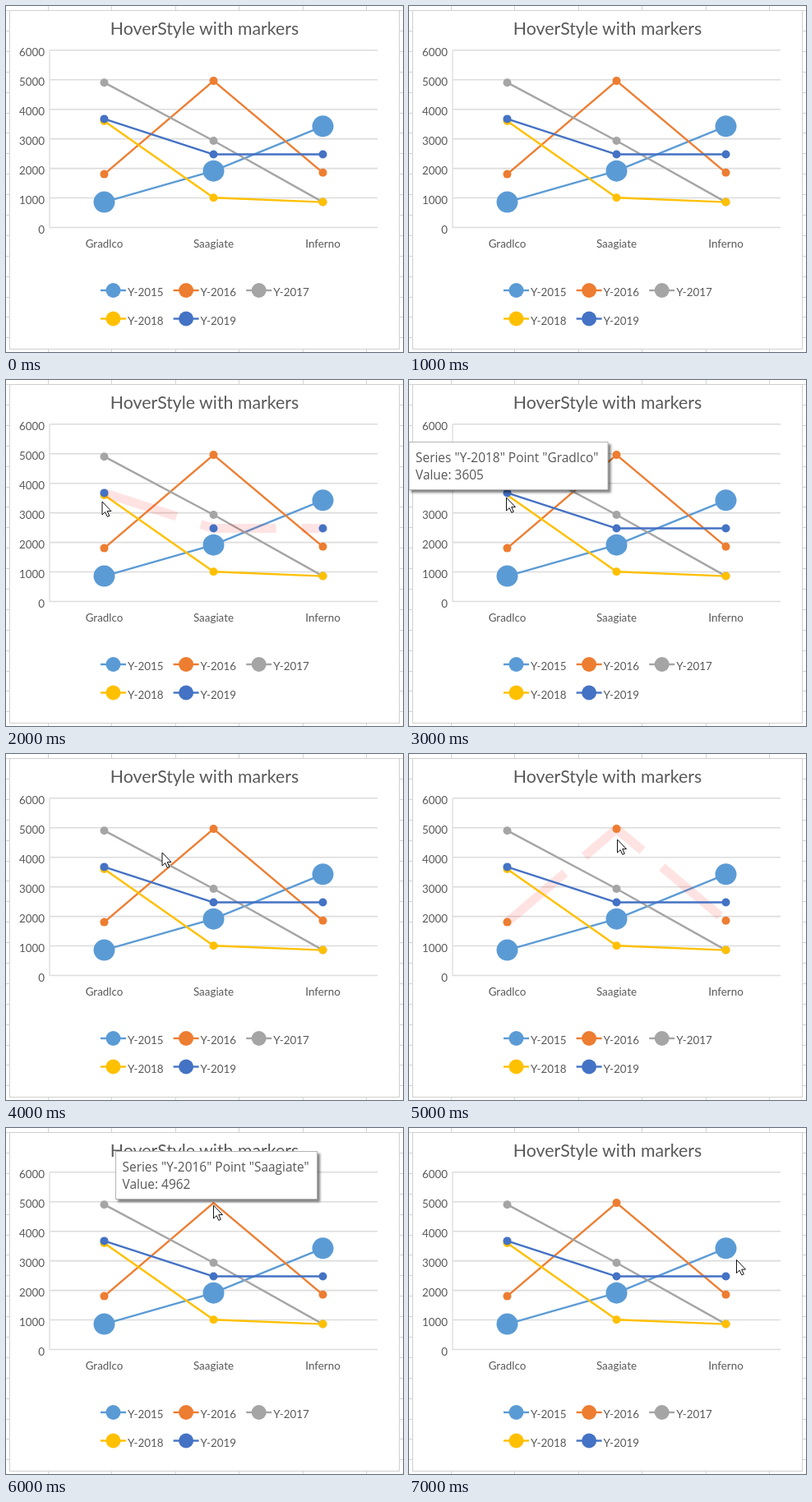
Write an HTML page that moves like this. It is 483 px wide and 421 px high and loops after 8000 ms.

```html
<!DOCTYPE html>
<html lang="en">
<head>
<meta charset="utf-8">
<style>
  html, body { margin: 0; width: 100%; height: 100%; overflow: hidden; background: #fff; }
  svg { display: block; }
  text { font: 13.4px Lato, sans-serif; fill: #595959; }
  .title { font-size: 21.3px; }
  .tip text { font: 15.45px "Open Sans", sans-serif; fill: #575757; }
  .middle { text-anchor: middle; }
  .end { text-anchor: end; }
  .hover { stroke: rgba(255, 0, 0, .11); stroke-width: 11; stroke-dasharray: 92.5 31; }
</style>
</head>
<body>
<svg id="stage" width="483" height="421" viewBox="0 0 483 421"></svg>
<script>
const stage = document.getElementById('stage');
const STEP_MS = 1000;
const columns = [119.5, 252.5, 385.5];
const categories = ['Gradlco', 'Saagiate', 'Inferno'];
const series = [
  { name: 'Y-2015', color: '#5b9bd5', radius: 13, values: [860, 1915, 3425] },
  { name: 'Y-2016', color: '#ed7d31', radius: 5, values: [1805, 4962, 1855] },
  { name: 'Y-2017', color: '#a5a5a5', radius: 5, values: [4905, 2935, 860] },
  { name: 'Y-2018', color: '#ffc000', radius: 5, values: [3605, 1010, 860] },
  { name: 'Y-2019', color: '#4472c4', radius: 5, values: [3675, 2475, 2475] },
];

// One entry per step: pointer position, hovered series, tooltip
const steps = [
  {},
  {},
  { cursor: [117, 148], hover: 4 },
  { cursor: [118.5, 143], tip: { x: 0, y: 75.5, width: 242, series: 3, point: 0 } },
  { cursor: [190, 120] },
  { cursor: [253.5, 104], hover: 1 },
  { cursor: [252.5, 94], tip: { x: 133.5, y: 28.5, width: 245, series: 1, point: 1 } },
  { cursor: [398.5, 160.5] },
];

const valueY = value => 269.5 - value * 0.03595;
const text = (x, y, content, cls = '') => `<text x="${x}" y="${y}" class="${cls}">${content}</text>`;
const line = (x1, y1, x2, y2, color, width = 1) =>
  `<path d="M${x1} ${y1}L${x2} ${y2}" stroke="${color}" stroke-width="${width}"/>`;
const dot = (x, y, r, color) => `<circle cx="${x}" cy="${y}" r="${r}" fill="${color}"/>`;

function sheet() {
  let out = '';
  for (let x = 51; x < 483; x += 77.4) out += line(Math.round(x) + .5, 0, Math.round(x) + .5, 421, '#d4d4d4');
  for (let y = 5; y < 421; y += 24.9) out += line(0, Math.round(y) + .5, 483, Math.round(y) + .5, '#d4d4d4');
  return out + '<rect x="4.5" y="5.5" width="474" height="412" fill="#fff" stroke="#d0d0d0"/>';
}

function axes() {
  let out = text(241.5, 35, 'HoverStyle with markers', 'title middle');
  for (let value = 0; value <= 6000; value += 1000) {
    const y = valueY(value);
    out += line(53, y, 452, y, '#dcdcdc', 1.6) + text(47, y + 7, value, 'end');
  }
  out += line(53, 54, 53, 270, '#dcdcdc', 1.3);
  categories.forEach((name, i) => out += text(columns[i], 294, name, 'middle'));
  return out;
}

function legend() {
  return series.map(({ name, color }, i) => {
    const x = 115 + i % 3 * 88.6, y = i < 3 ? 346 : 380.5;
    return line(x, y, x + 31, y, color, 2.4) + dot(x + 15.5, y, 9, color) + text(x + 33, y + 7, name);
  }).join('');
}

function plot({ hover, tip }) {
  return series.map(({ color, radius, values }, i) => {
    const points = values.map((value, k) => [columns[k], valueY(value)]);
    const style = i === hover ? 'class="hover"' : `stroke="${color}" stroke-width="2.4"`;
    const markers = points.map(([x, y], k) =>
      tip && tip.series === i && tip.point === k ? '' : dot(x, y, radius, color));
    return `<polyline points="${points.join(' ')}" fill="none" stroke-linejoin="round" ${style}/>` + markers.join('');
  }).join('');
}

function tooltip({ x, y, width, series: s, point }) {
  const { name, values } = series[s];
  return `<g class="tip">
    <rect x="${x}" y="${y}" width="${width}" height="58" fill="#fff" stroke="#b4b4b4"
      style="filter: drop-shadow(3px 3px 1.5px rgba(0, 0, 0, .5))"/>
    ${text(x + 8, y + 24.5, `Series "${name}" Point "${categories[point]}"`)}
    ${text(x + 8, y + 45.5, `Value: ${values[point]}`)}</g>`;
}

const pointer = ([x, y]) =>
  `<path transform="translate(${x} ${y})" d="M0 0V16L3.7 12.6L6.3 18.4L8.8 17.3L6.2 11.6H11Z" fill="#fff" stroke="#111"/>`;

const backdrop = sheet() + axes() + legend();
let shown = -1;

function draw(now) {
  const index = Math.floor(now / STEP_MS) % steps.length;
  if (index !== shown) {
    const step = steps[index];
    stage.innerHTML = backdrop + plot(step) +
      (step.tip ? tooltip(step.tip) : '') + (step.cursor ? pointer(step.cursor) : '');
    shown = index;
  }
  requestAnimationFrame(draw);
}
draw(performance.now());
</script>
</body>
</html>
```
